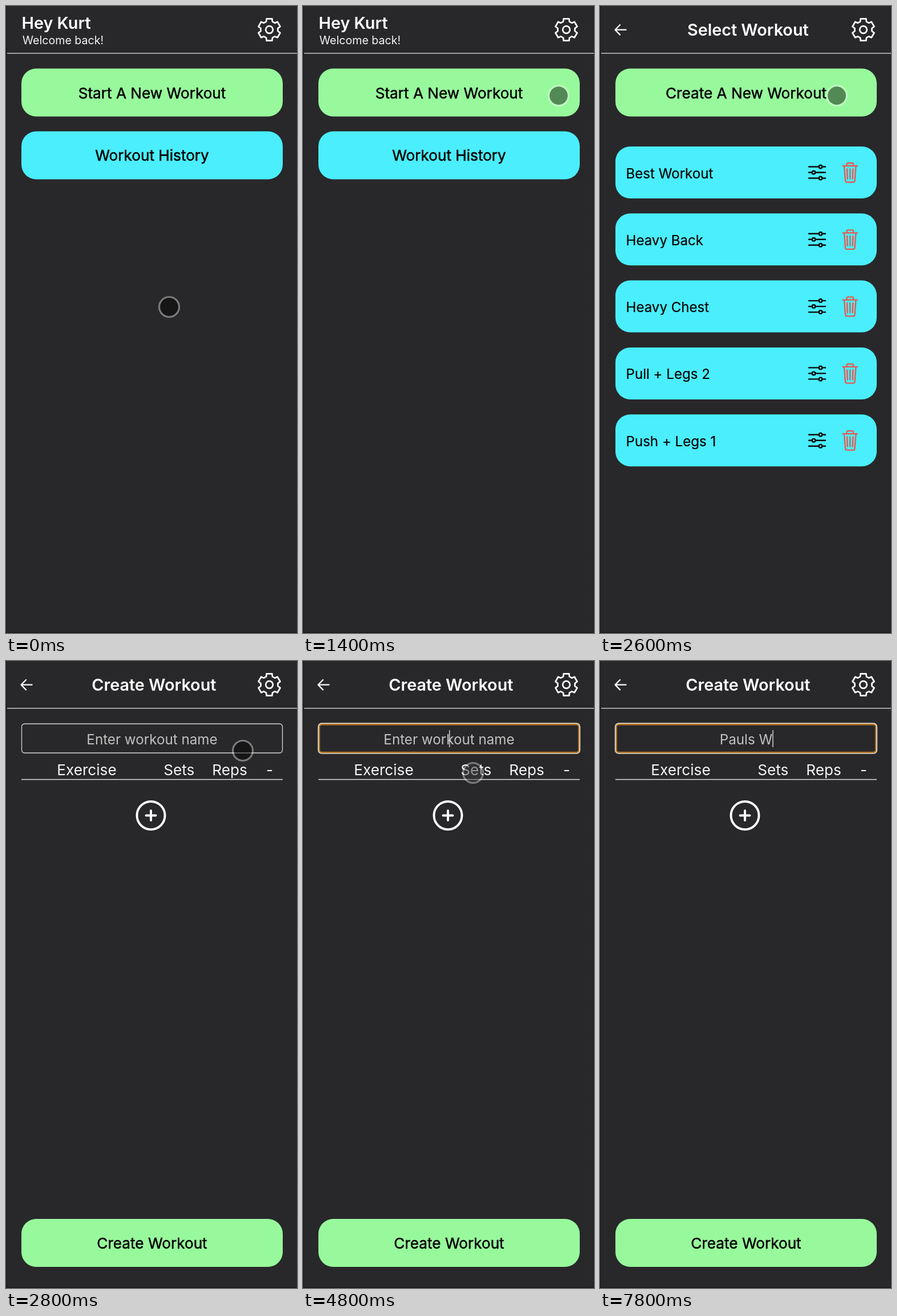
These frames come from a looping animation (510x1098 px, 8000 ms). An HTML page:

```html
<!DOCTYPE html>
<html lang="en">
<head>
<meta charset="utf-8">
<title>Workout app</title>
<style>
  html, body { margin: 0; width: 100%; height: 100%; overflow: hidden; background: #28282a; }
  svg { display: block; width: 510px; height: 1098px; font-family: Inter, sans-serif; }
  text { white-space: pre; fill: #f4f4f4; font-size: 26.15px; }
  .mid { text-anchor: middle; }
  .title { font-size: 28.77px; font-weight: 600; fill: #fff; }
  .label { fill: #000; stroke: #000; stroke-width: .5; text-anchor: middle; }
  .item { fill: #000; stroke: #000; stroke-width: .2; font-size: 24.1px; }
  .green { fill: #98f99c; }
  .cyan { fill: #4aeefc; }
  .line { fill: none; stroke: #fff; stroke-linecap: round; stroke-linejoin: round; }
  #entry { font-size: 24.2px; fill: #c2c2c2; }
</style>
</head>
<body>
<svg viewBox="0 0 510 1098">
  <defs>
    <g id="sliders" class="line" style="stroke:#0b0b0b" stroke-width="2.4">
      <path d="M366 281.5H383M390 281.5H395M366 291.5H371M378 291.5H395M366 301.5H383M390 301.5H395"/>
      <circle cx="386.5" cy="281.5" r="2.8"/><circle cx="374.5" cy="291.5" r="2.8"/><circle cx="386.5" cy="301.5" r="2.8"/>
    </g>
    <g id="trash" class="line" style="stroke:#e9584f" stroke-width="2.3">
      <path d="M425.5 280H451M428 280L430 306Q430.2 308.5 432.5 308.5H444Q446.3 308.5 446.5 306L448.500 280"/>
      <path d="M432.500 280V277Q432.500 275 434.500 275H442Q444 275 444 277V280M438.200 285.500V302.500M433 285.500L433.700 302.500M443.400 285.500L442.700 302.500"/>
    </g>
  </defs>

  <rect width="510" height="1098" fill="#28282a"/>
  <path d="M.6 0V1098M0 1097.300H510" stroke="#17171a" stroke-width="1.3"/>
  <path d="M508.500 0V1098" stroke="#1f1f21" stroke-dasharray="4 4"/>
  <path d="M2 82.700H510" stroke="#c4c4c4" stroke-width="1.500"/>
  <g class="line" stroke-width="2.700">
    <path id="gear"/>
    <circle cx="461.500" cy="41.500" r="6.300"/>
  </g>
  <path id="back" class="line" stroke-width="2.300" d="M45.500 41.700H27M35 33L26.500 41.700L35 50.400"/>

  <g id="home">
    <text class="title" x="27.500" y="40">Hey Kurt</text>
    <text x="28.800" y="67" style="font-size:19.6px">Welcome back!</text>
    <rect class="green" x="27" y="109.500" width="458" height="84" rx="26"/>
    <text class="label" x="256" y="161.500">Start A New Workout</text>
    <rect class="cyan" x="27" y="219.500" width="458" height="84" rx="26"/>
    <text class="label" x="256" y="271">Workout History</text>
  </g>

  <g id="select">
    <text class="title mid" x="259.300" y="52">Select Workout</text>
    <rect class="green" x="27" y="109.500" width="458" height="84" rx="26"/>
    <text class="label" x="256" y="161.500">Create A New Workout</text>
  </g>

  <g id="create">
    <text class="title mid" x="259.300" y="52">Create Workout</text>
    <rect x="27.500" y="110" width="457" height="51" rx="5" fill="none" stroke="#d8d8d8" stroke-width="1.300"/>
    <g id="focus" fill="none">
      <rect x="28.700" y="111.200" width="454.600" height="48.800" rx="4.500" stroke="#b47420" stroke-width="2.400"/>
      <rect x="26.700" y="109.200" width="458.600" height="52.800" rx="6" stroke="#dcd3c6" stroke-width="1.700"/>
    </g>
    <text id="entry" class="mid" x="256" y="146"></text>
    <rect id="caret" y="121" width="1.500" height="30" fill="#d0d0d0"/>
    <text class="mid" x="141.500" y="199.500">Exercise</text>
    <text class="mid" x="303.300" y="199.500">Sets</text>
    <text class="mid" x="392" y="199.500">Reps</text>
    <text class="mid" x="462" y="199.500">-</text>
    <path d="M27 207.500H485" stroke="#dedede" stroke-width="1.500"/>
    <g class="line" stroke-width="3.900">
      <circle cx="254" cy="270.500" r="24.500"/>
      <path d="M245.500 270.500H262.500M254 262V279"/>
    </g>
    <rect class="green" x="27" y="977" width="458" height="84" rx="26"/>
    <text class="label" x="256" y="1029">Create Workout</text>
  </g>

  <g id="cursor">
    <circle id="dot" r="16"/>
    <circle r="17.500" fill="none" stroke="#fff" stroke-opacity=".38" stroke-width="3.200"/>
  </g>
</svg>
<script>
const LOOP = 8000, STEP = 200;
const SELECT_AT = 1600, CREATE_AT = 2800, FOCUS_AT = 3800, TYPE_AT = 6000;
const keyTimes = [TYPE_AT, 6400, 6600, 6800, 7200, 7400, 7800];
const typed = 'Pauls W';
const $ = id => document.getElementById(id);
const show = (id, on) => $(id).style.display = on ? '' : 'none';

// Pointer path: time, x, y
const path = [
  [0, 286, 527], [200, 262, 490], [400, 215, 400], [600, 185, 290], [800, 250, 200],
  [1000, 390, 158], [1200, 474, 147], [1400, 448, 157], [1600, 447, 157], [2400, 415, 157],
  [2800, 415, 157], [3200, 365, 144], [3600, 301, 152], [3800, 298, 193], [4200, 298, 196]
];

function pointerAt(t) {
  const i = path.findIndex(p => p[0] > t);
  if (i < 0) return path[path.length - 1].slice(1);
  const [a, b] = [path[i - 1], path[i]];
  const k = (t - a[0]) / (b[0] - a[0]);
  return [1, 2].map(n => a[n] + (b[n] - a[n]) * k);
}

function gearPath() {
  const points = [];
  for (let tooth = 30; tooth < 390; tooth += 60) {
    for (const [r, turn] of [[15.2, -21], [19.8, -14], [19.8, 14], [15.2, 21]]) {
      const a = (tooth + turn) * Math.PI / 180;
      points.push((461.5 + r * Math.cos(a)).toFixed(2) + ' ' + (41.5 + r * Math.sin(a)).toFixed(2));
    }
  }
  return 'M' + points.join('L') + 'Z';
}

$('gear').setAttribute('d', gearPath());
$('select').innerHTML += ['Best Workout', 'Heavy Back', 'Heavy Chest', 'Pull + Legs 2', 'Push + Legs 1']
  .map((name, i) => `<g transform="translate(0 ${i * 117.3})">
    <rect class="cyan" x="27" y="246" width="458" height="91" rx="26"/>
    <text class="item" x="45.5" y="301.500">${name}</text>
    <use href="#sliders"/><use href="#trash"/></g>`).join('');

function draw(now) {
  const t = Math.floor(now % LOOP / STEP) * STEP;
  show('home', t < SELECT_AT);
  show('back', t >= SELECT_AT);
  show('select', t >= SELECT_AT && t < CREATE_AT);
  show('create', t >= CREATE_AT);
  show('focus', t >= FOCUS_AT);
  show('caret', t >= FOCUS_AT);
  show('cursor', t < TYPE_AT);

  const count = keyTimes.filter(k => k <= t).length;
  const entry = $('entry');
  entry.textContent = count ? typed.slice(0, count) : 'Enter workout name';
  const half = count && entry.getComputedTextLength() / 2;
  $('caret').setAttribute('x', 256 + half);

  $('cursor').setAttribute('transform', `translate(${pointerAt(t)})`);
  $('dot').setAttribute('fill', t < FOCUS_AT ? 'rgba(0,0,0,.45)' : 'rgba(56,56,58,.5)');
  requestAnimationFrame(draw);
}
requestAnimationFrame(draw);
</script>
</body>
</html>
```
